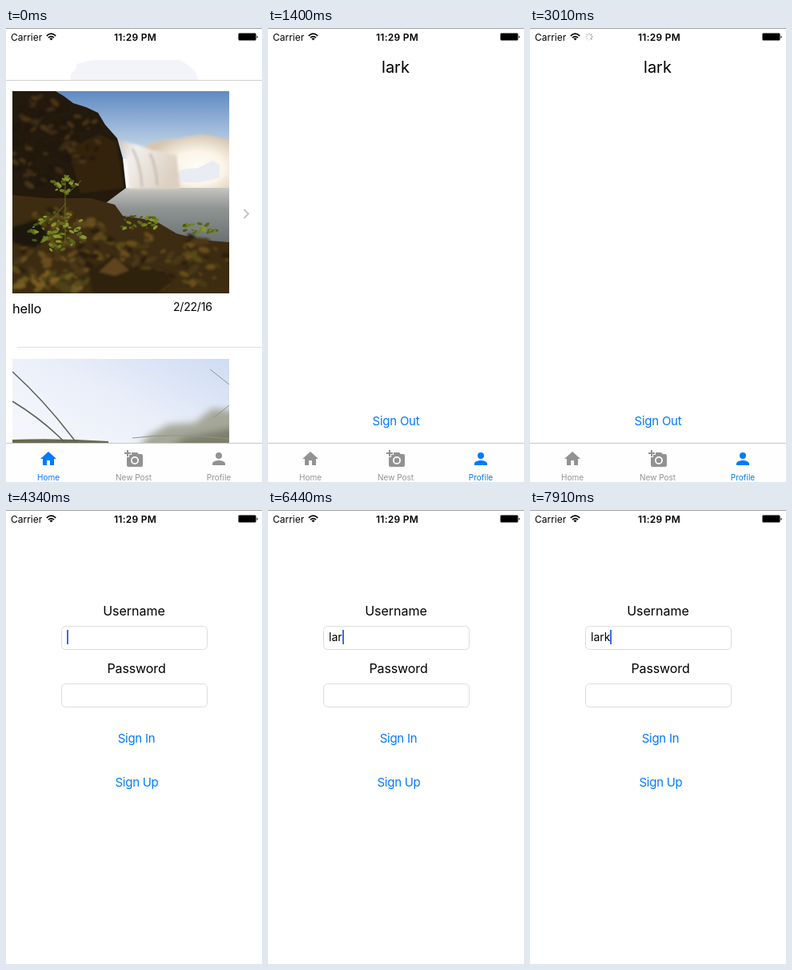
Write an HTML page that moves like this. It is 320 by 568 pixels and loops after 8000 ms.

```html
<!DOCTYPE html>
<html lang="en">
<head>
<meta charset="utf-8">
<title>Photo feed sign-out</title>
<style>
html, body { margin: 0; width: 100%; height: 100%; overflow: hidden; background: #fff; }
svg { display: block; }
text { font-family: Inter, Roboto, sans-serif; }
.mid { text-anchor: middle; }
.link { fill: #007aff; font-size: 15px; letter-spacing: -.25px; }
.label { font-size: 16px; }
.tab { fill: #929292; font-size: 10px; }
.tab.on { fill: #007aff; }
.field { fill: #fff; stroke: #dcdcdc; }
</style>
</head>
<body>
<svg width="320" height="568" viewBox="0 0 320 568">
  <defs>
    <linearGradient id="sky" x2="0" y2="1"><stop stop-color="#5f8ac2"/><stop offset="1" stop-color="#d3e1ee"/></linearGradient>
    <linearGradient id="lake" x2="0" y2="1"><stop stop-color="#c6c5c0"/><stop offset=".35" stop-color="#8f9493"/><stop offset="1" stop-color="#656b6d"/></linearGradient>
    <linearGradient id="fall" x2="1" y2=".4"><stop stop-color="#c9c2ba"/><stop offset=".3" stop-color="#f2efec"/><stop offset="1" stop-color="#dcd0c2"/></linearGradient>
    <linearGradient id="haze" y1=".7" y2="0"><stop stop-color="#f4f6fb"/><stop offset=".45" stop-color="#e9eef9"/><stop offset="1" stop-color="#cfdcf3"/></linearGradient>
    <radialGradient id="glow"><stop stop-color="#fffdf8"/><stop offset=".5" stop-color="#fbf4e8"/><stop offset="1" stop-color="#fbf4e8" stop-opacity="0"/></radialGradient>
    <filter id="soft"><feGaussianBlur stdDeviation="4"/></filter>
    <filter id="blend"><feGaussianBlur stdDeviation="1.6"/></filter>
    <filter id="fine"><feGaussianBlur stdDeviation=".7"/></filter>
  </defs>
  <rect width="320" height="568" fill="#fff"/>

  <g id="home">
    <path d="M81 65V58L88 50V45L109 40H216L226 45 237 55 240 65Z" fill="#f3f4f9"/>
    <path d="M0 65.5H320" stroke="#cfcfcf"/>
    <svg x="8" y="79" width="271" height="253">
      <rect width="271" height="85" fill="url(#sky)"/>
      <path d="M150 78Q180 58 204 60L238 54 280 62V130H150Z" fill="#d6c6b1" filter="url(#blend)"/>
      <ellipse cx="232" cy="96" rx="66" ry="42" fill="url(#glow)"/>
      <path d="M204 106L211 98 232 96 250 87 259 92V108L236 114H212Z" fill="#e9edf3"/>
      <path d="M90 121H271V195H90Z" fill="url(#lake)"/>
      <g filter="url(#blend)">
        <path d="M131 61Q155 66 175 74L205 80 210 122H145Q146 88 131 61Z" fill="url(#fall)"/>
        <path d="M150 72Q160 90 162 120M172 78Q180 95 181 118" fill="none" stroke="#bdb3aa" stroke-width="3" opacity=".7"/>
      </g>
      <path d="M0 0H54L64 6 76 15 92 20 107 27 116 42 131 59 138 84 142 121 110 145 0 145Z" fill="#23190d"/>
      <path d="M70 72L108 54 130 64 139 121 85 128Z" fill="#38280f" opacity=".8" filter="url(#blend)"/>
      <path d="M0 130L42 134 98 134 128 142 138 156 178 162 205 178 235 186 271 189V253H0Z" fill="#3d2c12"/>
      <g id="rocks" filter="url(#blend)"></g>
      <g filter="url(#blend)">
        <path d="M95 225L125 205 150 222 192 224 200 240 180 253H100Z" fill="#2d200f"/>
        <path d="M108 226L128 208 146 224 128 231Z" fill="#60441f"/>
        <path d="M0 170L30 160 45 178 28 196 0 190Z" fill="#1e160b"/>
      </g>
      <path d="M66 104V190M67 140L45 166M67 130L86 112" stroke="#66711c" fill="none"/>
      <g id="plants" filter="url(#fine)"></g>
    </svg>
    <text x="8" y="357" font-size="16.5" letter-spacing="-.2">hello</text>
    <text x="209" y="354" font-size="14" letter-spacing="-.2">2/22/16</text>
    <path d="M297.5 227L303 232.5 297.5 238" fill="none" stroke="#c4c4c9" stroke-width="2"/>
    <path d="M14 399.5H320" stroke="#e0e0e0"/>
    <svg x="8" y="414" width="271" height="105">
      <rect width="271" height="105" fill="url(#haze)"/>
      <g filter="url(#soft)">
        <path d="M150 120L170 96 195 82 228 80 250 62 285 66V120Z" fill="#a5a798"/>
        <path d="M185 120L215 98 285 84V120Z" fill="#7d7f69"/>
      </g>
      <path d="M0 105V101Q60 99 120 103V105Z" fill="#686a50" filter="url(#fine)"/>
      <g fill="none" stroke="#5b6057" stroke-width="1.5">
        <path d="M0 16Q42 54 80 105M0 53Q38 76 66 105"/>
        <path d="M247 13L271 32M271 58L252 73M150 99Q200 92 271 100" stroke="#8f948c" stroke-width="1"/>
      </g>
    </svg>
  </g>

  <g id="profile">
    <text class="mid" x="159.5" y="56" font-size="20" data-name></text>
    <text class="link mid" id="out" x="160" y="497">Sign Out</text>
  </g>

  <g id="tabs">
    <rect y="519" width="320" height="49" fill="#fefefe"/>
    <path d="M0 519.5H320" stroke="#c8c8c8"/>
    <g class="tab" id="homeTab">
      <path transform="translate(41 527)" d="M10 20v-6h4v6h5v-8h3L12 3 2 12h3v8z"/>
      <text class="mid" x="53" y="566">Home</text>
    </g>
    <g class="tab">
      <path transform="translate(148 527)" fill-rule="evenodd" d="M3 4V1h2v3h3v2H5v3H3V6H0V4zM6 10V7h3V4h7l1.8 2H21a2 2 0 0 1 2 2v12a2 2 0 0 1-2 2H5a2 2 0 0 1-2-2V10zM13 9a5 5 0 1 0 0 10a5 5 0 1 0 0-10zM13 10.8a3.2 3.2 0 1 1 0 6.4a3.2 3.2 0 1 1 0-6.4z"/>
      <text class="mid" x="159.5" y="566">New Post</text>
    </g>
    <g class="tab" id="profileTab">
      <path transform="translate(254 527)" d="M12 12a4 4 0 1 0 0-8a4 4 0 1 0 0 8zm0 2c-2.7 0-8 1.3-8 4v2h16v-2c0-2.7-5.3-4-8-4z"/>
      <text class="mid" x="266" y="566">Profile</text>
    </g>
  </g>

  <g id="login">
    <text class="label mid" x="160" y="132">Username</text>
    <rect class="field" x="69.5" y="145.5" width="182" height="29" rx="5"/>
    <text class="label mid" x="163" y="204" letter-spacing="-.1">Password</text>
    <rect class="field" x="69.5" y="217.5" width="182" height="29" rx="5"/>
    <text id="typed" x="76" y="164" font-size="14"></text>
    <rect id="caret" x="76" y="150" width="2" height="18" fill="#4169e1"/>
    <text class="link mid" x="163" y="290.5">Sign In</text>
    <text class="link mid" x="163.5" y="346">Sign Up</text>
  </g>

  <path d="M0 .5H320" stroke="#a3a3a3"/>
  <text x="6" y="15.5" font-size="12">Carrier</text>
  <g fill="none" stroke="#000" stroke-width="1.7">
    <path d="M50.8 9.8Q56.5 4.6 62.2 9.8M53 12.1Q56.5 9 60 12.1"/>
    <path d="M54.4 13.2Q56.5 11.8 58.6 13.2L56.5 15.6Z" fill="#000" stroke="none"/>
  </g>
  <g id="spinner"></g>
  <text x="135" y="15.5" font-size="12" font-weight="600" letter-spacing=".25">11:29 PM</text>
  <rect x="290.5" y="6.5" width="22" height="9" rx="1.5" fill="none" stroke="#777"/>
  <rect x="291" y="7" width="21" height="8" rx=".5"/>
  <path d="M313.5 9.5Q316 11 313.5 13Z"/>
</svg>
<script>
const $ = id => document.getElementById(id);
const NAME = 'lark', LOOP = 8000, STEP = 70;
const KEYS = [6160, 6300, 6440, 6720];

let seed = 7;
const random = () => (seed = seed * 16807 % 2147483647) / 2147483647;

function add(parent, tag, attrs) {
  const node = document.createElementNS('http://www.w3.org/2000/svg', tag);
  for (const key in attrs) node.setAttribute(key, attrs[key]);
  return parent.appendChild(node);
}

// Scatter small tilted blobs inside an ellipse
function scatter(id, count, cx, cy, rx, ry, size, colors) {
  for (let i = 0; i < count; i++) {
    const angle = random() * 2 * Math.PI, r = Math.sqrt(random());
    const x = cx + rx * r * Math.cos(angle), y = cy + ry * r * Math.sin(angle);
    const w = size * (.4 + random());
    add($(id), 'ellipse', {
      rx: w, ry: w * .5, fill: colors[Math.floor(random() * colors.length)],
      transform: `translate(${x} ${y}) rotate(${random() * 90 - 45})`
    });
  }
}

const rock = ['#3d2c12', '#1a1209', '#4a3515', '#20170c'];
const moss = ['#6b4d1d', '#4c3914', '#2a1e0e', '#5a4a18'];
const leaf = ['#74801f', '#59681a', '#8c9730', '#465617'];
scatter('rocks', 90, 36, 64, 40, 58, 5, rock);
scatter('rocks', 25, 88, 60, 25, 30, 4, rock);
scatter('rocks', 110, 60, 198, 66, 52, 6, moss);
scatter('rocks', 100, 195, 214, 82, 34, 6, moss);
scatter('rocks', 35, 50, 240, 48, 12, 5, ['#6b5a20', '#7d5d22', '#4d4516']);
scatter('plants', 28, 67, 116, 17, 11, 3, leaf);
scatter('plants', 75, 57, 176, 36, 25, 3.5, leaf);
scatter('plants', 30, 158, 165, 25, 10, 3, leaf);
scatter('plants', 24, 234, 172, 25, 8, 3, leaf);

for (let i = 0; i < 8; i++)
  add($('spinner'), 'path', {
    d: 'M74 8.6V6.2', stroke: '#777', transform: `rotate(${i * 45} 74 11)`
  });
document.querySelector('[data-name]').textContent = NAME;

const show = (id, on) => $(id).style.display = on ? '' : 'none';
const ramp = (t, from, to) => Math.min(1, Math.max(0, (t - from) / (to - from)));

function caretAlpha(t) {
  if (t < 4340) return 0;
  if (t < 6160) return 1 - ramp(t, 4760, 4970) + ramp(t, 5320, 5460) - ramp(t, 5810, 6020);
  return 1 - ramp(t, 7210, 7420) + ramp(t, 7700, 7910);
}

function draw() {
  const t = Math.floor(performance.now() % LOOP / STEP) * STEP;
  const home = t < 1400, login = t >= 3080;
  show('home', home);
  show('profile', !home && !login);
  show('tabs', !login);
  show('login', login);
  $('homeTab').classList.toggle('on', home);
  $('profileTab').classList.toggle('on', !home);
  $('out').style.opacity = t < 2590 ? 1 : .2 + .8 * ramp(t, 2660, 2940);

  show('spinner', t >= 2730 && t < 3290);
  const turn = Math.floor((t - 2730) / STEP);
  [...$('spinner').children].forEach((spoke, i) =>
    spoke.style.opacity = .3 + .7 * ((i - turn + 80) % 8) / 7);

  const typed = $('typed');
  typed.textContent = NAME.slice(0, KEYS.filter(key => t >= key).length);
  $('caret').setAttribute('x', 76 + Math.round(login ? typed.getComputedTextLength() : 0));
  $('caret').style.opacity = caretAlpha(t);
  requestAnimationFrame(draw);
}
draw();
</script>
</body>
</html>
```
